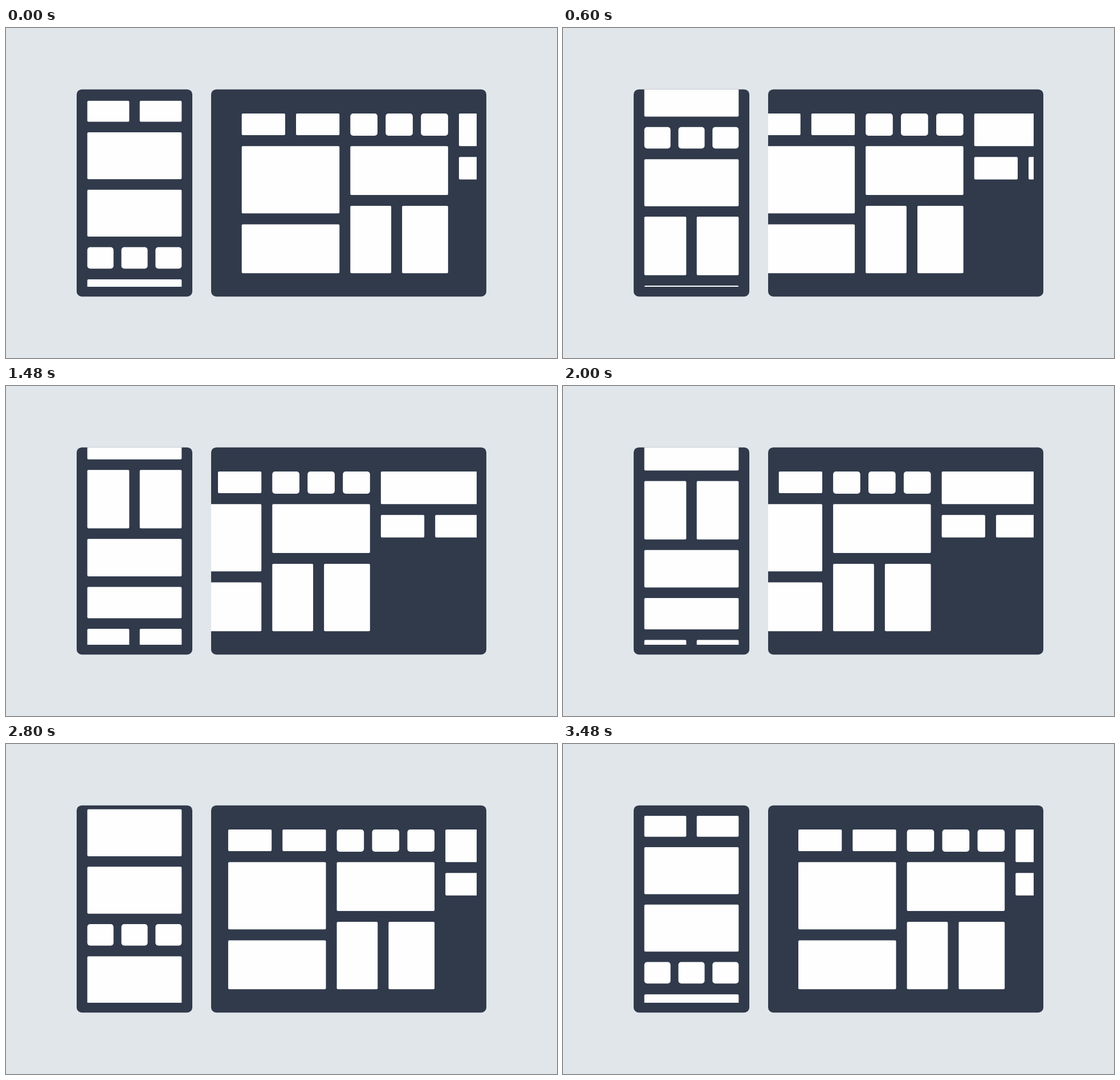
An HTML page with a canvas that plays this animation: 967x579 px, repeating every 3500 ms.

```html
<!DOCTYPE html>
<html lang="en">
<head>
<meta charset="utf-8">
<title>Scrolling layouts</title>
<style>
  html, body { margin: 0; width: 100%; height: 100%; overflow: hidden; background: #e1e6ea; }
  canvas { display: block; }
</style>
</head>
<body>
<canvas width="967" height="579"></canvas>
<script>
const ctx = document.querySelector('canvas').getContext('2d');
const LOOP = 3500, STEP = 20, MOVE = 1800;
const OUT = 54, BACK = 1845, HOLD = 80;
const SCROLL = 405.3, RATIO = 2.88;

// Each row: height in grid units, then the relative widths of its cards
const phone = [
  [4, 1, 1], [8.95, 1], [8.95, 1], [4.15, 1, 1, 1], [8.95, 1],
  [11.15, 1, 1], [7.15, 1], [6, 1], [4, 1, 1]
];
const tablet = [
  [[4, 1, 1], [12.4, 1], [9, 1]],
  [[4, 1, 1, 1], [9, 1], [12.4, 8, 9]],
  [[6, 1], [4.15, 1, 1]]
];

const bezier = (a, b, s) => 3 * a * s * (1 - s) ** 2 + 3 * b * s * s * (1 - s) + s ** 3;

// cubic-bezier(.25, .1, .25, 1), solved by bisection
function ease(p) {
  if (p <= 0) return 0;
  if (p >= 1) return 1;
  let lo = 0, hi = 1;
  for (let i = 0; i < 30; i++) {
    const mid = (lo + hi) / 2;
    if (bezier(.25, .25, mid) < p) lo = mid; else hi = mid;
  }
  return bezier(.1, 1, lo);
}

function scrollAt(t) {
  if (t < HOLD) return 0;
  return SCROLL * (ease((t - OUT) / MOVE) - ease((t - BACK) / MOVE));
}

function box(x, y, w, h, r) {
  ctx.beginPath();
  ctx.roundRect(x, y, w, h, r);
  ctx.fill();
}

// Stacks rows 18 units wide with gaps of 2; three in a row are rounder buttons
function stack(rows, left, y, unit) {
  for (const [height, ...parts] of rows) {
    const buttons = parts.length === 3;
    const gap = unit * (buttons ? 1.5 : 2);
    const sum = parts.reduce((a, b) => a + b);
    let x = left;
    for (const part of parts) {
      const w = (18 * unit - gap * (parts.length - 1)) * part / sum;
      box(x, y, w, buttons ? w * .82 : height * unit, buttons ? 5 : 2);
      x += w + gap;
    }
    y += (height + 2) * unit;
  }
}

function panel(x, width, clipWidth, clipHeight, drawContent) {
  const top = 107.7;
  ctx.fillStyle = '#303a4b';
  box(x, top, width, 363.5, 9);
  ctx.save();
  ctx.beginPath();
  ctx.rect(x, top, clipWidth, clipHeight);
  ctx.clip();
  ctx.fillStyle = '#fefefe';
  drawContent();
  ctx.restore();
}

function draw(now) {
  const scroll = scrollAt(Math.floor(now % LOOP / STEP) * STEP);
  ctx.fillStyle = '#e1e6ea';
  ctx.fillRect(0, 0, 967, 579);
  panel(124, 203, 203, 346.3, () => stack(phone, 142.7, 127.8 - scroll, 9.2));
  panel(360, 483, 466, 363, () => {
    const unit = 9.53;
    tablet.forEach((rows, i) => stack(rows, 413.7 + i * 20 * unit - scroll / RATIO, 150, unit));
  });
}

const start = performance.now();
(function tick() {
  draw(performance.now() - start);
  requestAnimationFrame(tick);
})();
</script>
</body>
</html>
```
